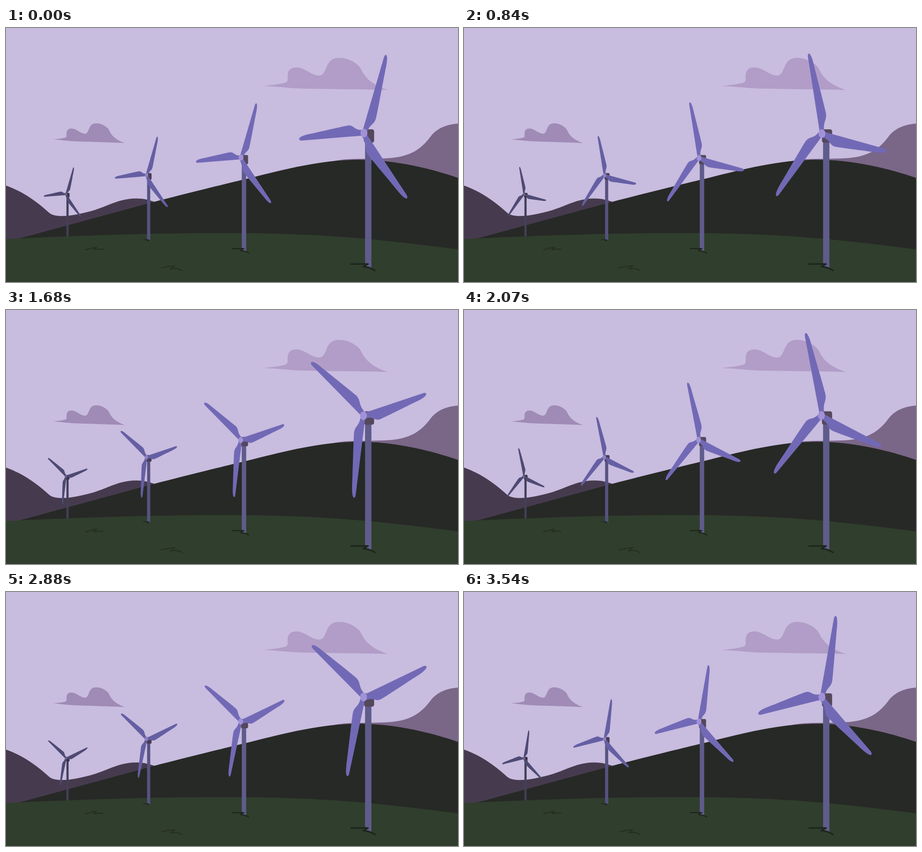
Animation, 998 px wide and 561 px high, one loop 3570 ms. Source, as an HTML page:

```html
<!DOCTYPE html>
<html lang="en">
<head>
<meta charset="utf-8">
<title>Wind farm</title>
<style>
  html, body { margin: 0; width: 100%; height: 100%; overflow: hidden; background: #c8bcdf; }
  svg { display: block; width: 100vw; height: 100vh; }
  .blade { fill: var(--blade); }
  .hub { fill: var(--hub); }
  .nacelle { fill: var(--nacelle); }
  .tower { fill: var(--tower); }
  .near { --blade: #7269b6; --hub: #a192d8; --nacelle: #54485d; --tower: #5f5c8b; }
  .mid { --blade: #655fa3; --hub: #8d82c0; --nacelle: #473d50; --tower: #575380; }
  .far { --blade: #4e4a73; --hub: #656083; --nacelle: #3a3243; --tower: #443f58; }
  .grass { fill: none; stroke: #1e261c; stroke-linejoin: round; }
</style>
</head>
<body>
<svg viewBox="0 0 998 561" preserveAspectRatio="none">
  <defs>
    <path id="cloud" d="M569 128C590 126 605 124 616 121C625 118 621 112 622 103C623 92 630 87 641 87C660 87 675 106 692 105C711 104 702 66 735 66C755 66 770 75 780 85C788 94 790 119 843 137C780 135 700 135 645 133.500C618 132 594 129 569 128Z"/>
    <path id="blade" class="blade" d="M-5 0L-4 -181Q-3 -188 1 -187Q6 -184 8.500 -166C13 -120 19 -72 21 -46C22.500 -26 9 -28 8 -4Z"/>
    <path id="tuft" class="grass" stroke-width="3.600" d="M-29 288.500H9.500L-1 294.500Q14 295 26 303.500"/>
    <g id="turbine">
      <path class="tower" d="M3 10H17V297L3 293Z"/>
      <rect class="nacelle" x=".5" y="-9" width="22.500" height="29.500" rx="4.500"/>
      <g transform="scale(.795 1)">
        <g id="rotor">
          <use href="#blade" transform="rotate(140)"/>
          <use href="#blade" transform="rotate(266) scale(.961)"/>
          <use href="#blade" transform="rotate(19.75) scale(.983)"/>
          <circle class="hub" cx=".7" cy="-.6" r="9.600"/>
        </g>
      </g>
    </g>
  </defs>

  <rect width="998" height="561" fill="#c8bcdf"/>
  <use href="#cloud" fill="#b19dc7"/>
  <use href="#cloud" fill="#9f8bb6" transform="matrix(.58 .0095 0 .6 -227 163.8)"/>
  <path fill="#7a6687" d="M720 295C745 287 790 290 836 288C890 286 915 270 938 239C953 220 975 213 998 211V340Z"/>
  <path fill="#463b4e" d="M0 348C40 362 72 387 94 407C108 421 148 416 196 402C230 391 252 376.500 288 376.500C307 376.500 318 381 328 384L40 480H0Z"/>
  <path fill="#272926" d="M25 466L327 384C420 360 480 345.500 530 333.500C605 315 690 291 780 291C860 291 940 311 998 331V520H25Z"/>
  <use href="#turbine" class="far" transform="translate(132.4 367.3) scale(.343)"/>
  <path fill="#303e2d" d="M0 466C130 460 300 453 470 453C680 453 800 463 998 489V561H0Z"/>

  <g class="grass" stroke-width="2.500" style="stroke:#263022">
    <path d="M175 490Q188 486 200 484L194 490Q204 487 215 489"/>
    <path d="M342 530Q358 526 373 525L363 532Q378 529 389 536"/>
  </g>

  <use href="#turbine" class="mid" transform="translate(310.1 325) scale(.49)"/>
  <path class="grass" stroke-width="1.500" d="M303 467.500H315L311 469.500H318"/>
  <g class="near" transform="translate(518.5 286.700) scale(.695)">
    <use href="#turbine"/><use href="#tuft"/>
  </g>
  <g class="near" transform="translate(789.8 232.700)">
    <use href="#turbine"/><use href="#tuft"/>
  </g>
</svg>
<script>
  const LOOP = 3570, TICK = 30, DEGREES_PER_POSE = 3.75;
  const rotor = document.getElementById('rotor');
  const start = performance.now();

  // Four poses are spread over every five ticks.
  function draw(now) {
    const tick = Math.floor(Math.max(0, now - start) % LOOP / TICK);
    const pose = Math.floor((tick * 4 + 1) / 5);
    rotor.setAttribute('transform', `rotate(${pose * DEGREES_PER_POSE})`);
    requestAnimationFrame(draw);
  }
  draw(start);
</script>
</body>
</html>
```
